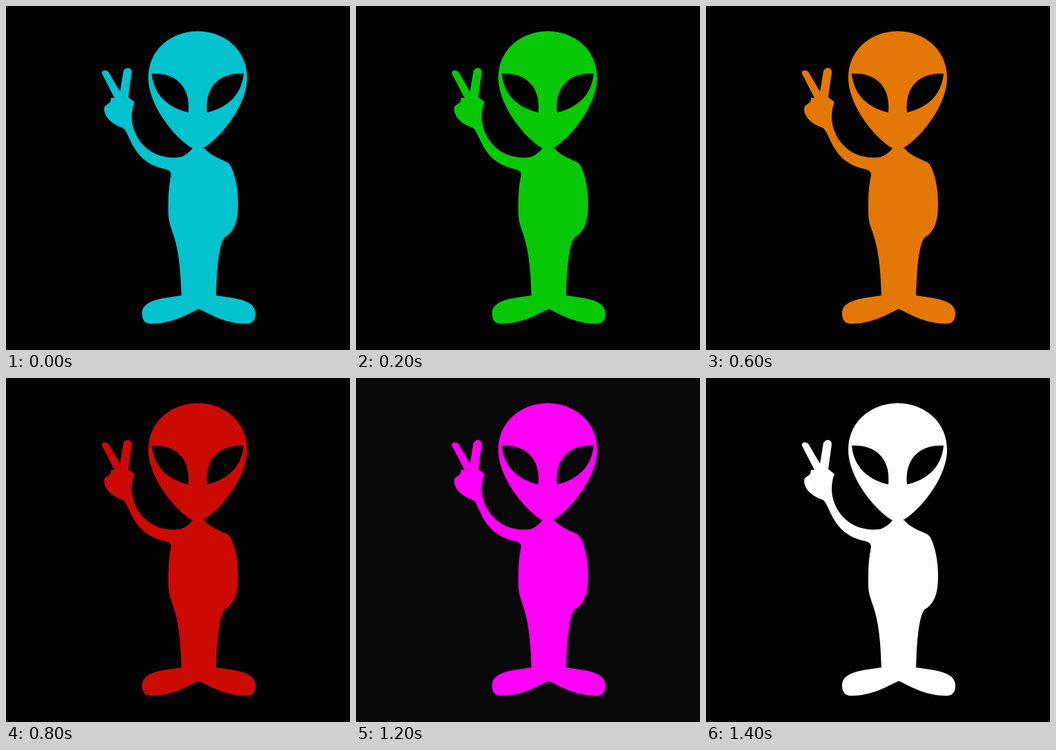
Recreate the animation shown at these times as an HTML page. Size 498 by 498 pixels, loop 1600 ms.

```html
<!DOCTYPE html>
<html lang="en">
<head>
<meta charset="utf-8">
<title>Alien colours</title>
<style>
  html, body { margin: 0; height: 100%; overflow: hidden; background: #020202; }
  svg {
    display: block; width: 100%; height: 100%;
    fill: currentColor; fill-rule: evenodd;
    animation: tint 1.6s step-end infinite;
  }
  @keyframes tint {
    0%    { color: #04c2ce; background: #020202; }
    12.5% { color: #08c808; }
    25%   { color: #e4c806; }
    37.5% { color: #e47806; }
    50%   { color: #cc0a04; }
    62.5% { color: #7800c4; }
    75%   { color: #ff00f6; background: #080808; }
    87.5% { color: #fdfffd; background: #020202; }
  }
</style>
</head>
<body>
<svg viewBox="0 0 498 498">
  <!-- half of the head with one eye, then mirrored -->
  <path id="head" d="M279 36.5C238 36 206 64 206 104S245 192 270 206H279Z
    M211 98C240 96 268 112 264 154C236 148 214 130 211 98Z"/>
  <use href="#head" transform="translate(555) scale(-1 1)"/>

  <path id="foot" d="M280 438C258 449 238 460 210 460Q197 460 197 445C197 425 227 423 254 419H280Z"/>
  <use href="#foot" transform="translate(558) scale(-1 1)"/>

  <!-- body, raised arm and hand -->
  <path d="M270 206H287C296 217 312 222 320 226S336 258 336 285S331 324 320 333
    Q306 336 304 421H254C252 325 235 330 235 298S236 262 239 244
    Q239 238 230 236C180 226 180 180 168 176
    C150 170 139 156 143 145L151 139 152 133H157
    L140 100C136 94 143 91 148 95L165 124
    L170 94C174 87 182 89 182 96L177 132 186 139
    Q182 148 182 162C183 190 206 224 252 219Q263 215 270 206Z"/>
</svg>
</body>
</html>
```
